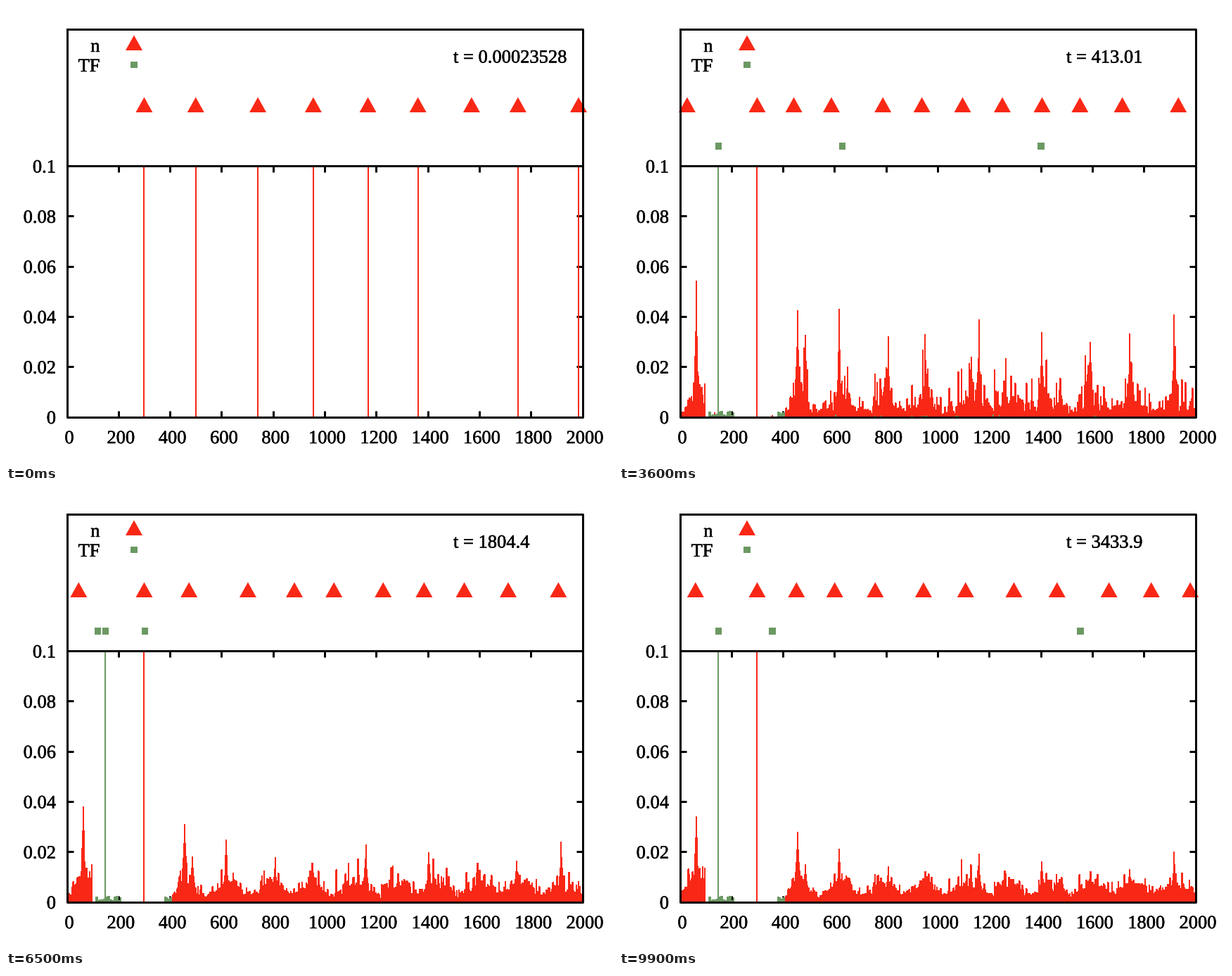
Write a matplotlib script that moves like this. It is 863 px wide and 649 px high and loops after 10 s.

```python
import numpy as np
import matplotlib.pyplot as plt
from matplotlib.animation import FuncAnimation
from matplotlib.collections import LineCollection, PolyCollection
from matplotlib.patheffects import withStroke

W, H, DPI = 863, 649, 128
FRAMES, STEP_MS = 100, 100
RED, GREEN = "#f92816", "#6c9963"
LEFT, RIGHT, TOP, MID, BOTTOM = 86.5, 819.5, 32.5, 227, 583.5
SITES = np.arange(0, 2001, 2)
rng = np.random.default_rng(11)

plt.rcParams.update({"font.family": "Liberation Serif", "text.hinting": "none"})


def pt(px):
    return px * 72 / DPI


def px_x(site):
    return LEFT + np.asarray(site) * (RIGHT - LEFT) / 2000


def px_y(value):
    return BOTTOM - np.minimum(value, 0.1) * (BOTTOM - MID) / 0.1


# The simulated clock speeds up in steps, then runs evenly to the end.
KEYS = [0, 14, 29, 45, 56, 74, 99]
CLOCK = [0.00023528, 5.2011, 77.784, 844.01, 1372.8, 2236.1, 3433.9]
times = np.interp(np.arange(FRAMES), [0, 4] + KEYS[1:],
                  [CLOCK[0], 0.1925] + CLOCK[1:])

FIXED, BOUND = 300, 150          # permanently occupied sites
START = [300, 500, 741, 956, 1168, 1362, 1570, 1750, 1985]
EARLY = [134, 300, 495, 650, 803, 962, 1123, 1223, 1367, 1570, 1752, 1922]
PEAKS = {64: .034, 457: .032, 487: .017, 618: .021, 808: .014, 953: .014,
         1160: .019, 1404: .016, 1593: .014, 1745: .015, 1918: .020}


def spikes(sites, heights):
    out = np.zeros(len(SITES))
    idx = np.clip(np.asarray(sites, int) // 2, 0, len(SITES) - 1)
    np.maximum.at(out, idx, heights)
    return out


def blocks(draw, size=2):
    """Random values held over a few neighbouring sites."""
    return np.repeat(draw(len(SITES) // size + 1), size)[:len(SITES)]


def between(lo, hi):
    return (SITES >= lo) & (SITES <= hi)


def early_red():
    visits = rng.uniform(0, 2000, 8)
    return np.maximum(spikes(START + EARLY, .15),
                      spikes(visits, rng.uniform(.05, .15, 8)))


def middle_red():
    """Clusters of narrow bars around the sites visited so far."""
    centres = np.array([s for s in [*EARLY, *PEAKS] if not 100 < s < 400])
    near = rng.normal(np.repeat(centres, 6), 8)
    out = np.maximum(spikes(centres, rng.uniform(.05, .12, len(centres))),
                     spikes(near, rng.exponential(.035, len(near))))
    haze = blocks(lambda n: rng.exponential(.008, n)) * between(1100, 1480)
    return np.maximum(out, haze)


def late_red(t, shared):
    """Ordered profile: a damped wave, speckle and a few lasting peaks."""
    age = (CLOCK[3] / t) ** 1.2
    wave = .0065 + .0045 * np.exp(-SITES / 2500) * np.cos(
        2 * np.pi * (SITES - 458) / 164)
    rise = np.clip((SITES - 385) / 55, 0, 1)
    edge = .004 + .010 * SITES / 100
    floor = np.where(SITES < 100, edge, wave * rise)
    z = .85 * shared + .5 * blocks(rng.standard_normal)
    sigma = .25 + .45 * age
    prof = .024 * np.tanh(floor * np.exp(sigma * (z - .3)) / .024)
    for site, h in PEAKS.items():
        top = h - .003 + .017 * age
        prof = np.maximum(prof, top * np.exp(-np.abs(SITES - site) / 7))
    prof[between(100, 384)] = 0
    return prof


def red_keys():
    shared = blocks(rng.standard_normal)
    start = spikes([s for s in START if s != 1570], 1)
    keys = [start, early_red(), middle_red()]
    keys += [late_red(t, shared) for t in CLOCK[3:]]
    return [np.maximum(k, spikes([FIXED], .95)) for k in keys]


def green_keys():
    early = spikes(rng.uniform(100, 1300, 6), rng.uniform(.01, .09, 6))
    speckle = blocks(lambda n: rng.uniform(.0006, .0025, n), 4)
    low = speckle * (between(112, 210) | between(380, 405))
    sparse = speckle * (blocks(rng.random, 10) < .12)
    bound = spikes([BOUND], .9)
    return [0 * low, early, np.maximum(low + sparse, bound / 6)] + [
        np.maximum(low, bound) for _ in CLOCK[3:]]


# Moment within the first two stretches at which each 100-site region changes
onsets = rng.uniform(.05, .85, (2, 21))


def region(site):
    return ((np.asarray(site) + 30) // 100).astype(int)


def stretch(n):
    return min(np.searchsorted(KEYS, n, "right") - 1, len(KEYS) - 2)


def progress(n, i):
    return (times[n] - CLOCK[i]) / (CLOCK[i + 1] - CLOCK[i])


def running_mean(keys):
    """Occupancy averaged over the elapsed clock time, for every frame."""
    for i in range(1, len(keys)):
        keys[i] = np.maximum(keys[i], keys[i - 1] * CLOCK[i - 1] / CLOCK[i])
    out = []
    for n in range(FRAMES):
        i = stretch(n)
        on = np.zeros(len(SITES))
        if i < 2:
            on = np.where(keys[i] > 0, 0, onsets[i][region(SITES)])
        g = np.clip((progress(n, i) - on) / (1 - on), 0, 1)
        a, b = keys[i] * CLOCK[i], keys[i + 1] * CLOCK[i + 1]
        out.append((a + g * (b - a)) / times[n])
    return out


def layout(n):
    """Random packing to the right of the fixed particle."""
    r = np.random.default_rng(500 + n)
    out = [r.uniform(15, 80), FIXED]
    s = r.normal(460, 14)
    while s < 1985:
        out.append(s)
        s += 145 + r.exponential(25)
    return out


def particles(n):
    i = stretch(n)
    if i > 1:
        return layout(n)
    f, when = progress(n, i), onsets[i]
    old, new = [(START, EARLY), (EARLY, layout(KEYS[2]))][i]
    return ([s for s in old if f < when[region(s)]]
            + [s for s in new if f >= when[region(s)]])


def factors(n):
    r = np.random.default_rng(900 + n)
    free = min((n + 11) // 12, 2)
    return [BOUND] * (n >= 24) + list(r.uniform(20, 1990, free))


def triangle(x, base):
    return [(x - 12, base), (x, base - 21.5), (x + 12, base)]


def square(x, y, r=4.7):
    return [(x - r, y - r), (x + r, y - r), (x + r, y + r), (x - r, y + r)]


def bars(values):
    keep = np.flatnonzero(values > .0004)
    return [[(x, BOTTOM), (x, y)]
            for x, y in zip(px_x(SITES[keep]), px_y(values[keep]))]


red, green = running_mean(red_keys()), running_mean(green_keys())

fig = plt.figure(figsize=(W / DPI, H / DPI), dpi=DPI, facecolor="white")
ax = fig.add_axes([0, 0, 1, 1])
ax.set(xlim=(0, W), ylim=(H, 0))
ax.axis("off")


def line(xs, ys, z):
    ax.plot(xs, ys, color="black", lw=pt(3), zorder=z,
            solid_capstyle="projecting" if z > 5 else "butt")


def label(x, y, s, ha):
    return ax.text(x, y, s, ha=ha, va="baseline", fontsize=pt(26.5), zorder=8,
                   path_effects=[withStroke(linewidth=pt(.5), foreground="black")])


for k in range(11):
    x = px_x(200 * k)
    label(x + 3.5, 621, f"{200 * k}", "center")
    if 0 < k < 10:
        line([x, x], [BOTTOM, BOTTOM - 9], 1)
        line([x, x], [MID, MID + 9], 1)
for k in range(6):
    y = px_y(.02 * k)
    label(71, y + 9.5, f"{.02 * k:.2g}", "right")
    if 0 < k < 5:
        line([LEFT, LEFT + 9], [y, y], 1)
        line([RIGHT, RIGHT - 9], [y, y], 1)
line([LEFT, RIGHT, RIGHT, LEFT, LEFT], [TOP, TOP, BOTTOM, BOTTOM, TOP], 6)
line([LEFT, RIGHT], [MID, MID], 6)

label(133.5, 65, "n", "right")
label(133.5, 93, "TF", "right")
clock = label(636, 80.5, "", "left")
ax.add_collection(PolyCollection([triangle(182, 63)], fc=RED, ec="none", zorder=4))
ax.add_collection(PolyCollection([square(182, 83.5)], fc=GREEN, ec="none", zorder=4))

bar_style = dict(lw=pt(2), antialiaseds=False)
red_bars = LineCollection([], colors=RED, zorder=2, **bar_style)
green_bars = LineCollection([], colors=GREEN, zorder=3, **bar_style)
tris = PolyCollection([], fc=RED, ec="none", zorder=5)
squares = PolyCollection([], fc=GREEN, ec="none", zorder=4)
for c in (red_bars, green_bars, tris, squares):
    ax.add_collection(c, autolim=False)


def update(n):
    red_bars.set_segments(bars(red[n]))
    green_bars.set_segments(bars(green[n]))
    tris.set_verts([triangle(px_x(s), 151) for s in particles(n)])
    squares.set_verts([square(px_x(s), 199) for s in factors(n)])
    clock.set_text(f"t = {times[n]:.5g}")
    return red_bars, green_bars, tris, squares, clock


anim = FuncAnimation(fig, update, frames=FRAMES, interval=STEP_MS,
                     repeat=True, repeat_delay=0)
plt.show()
```
